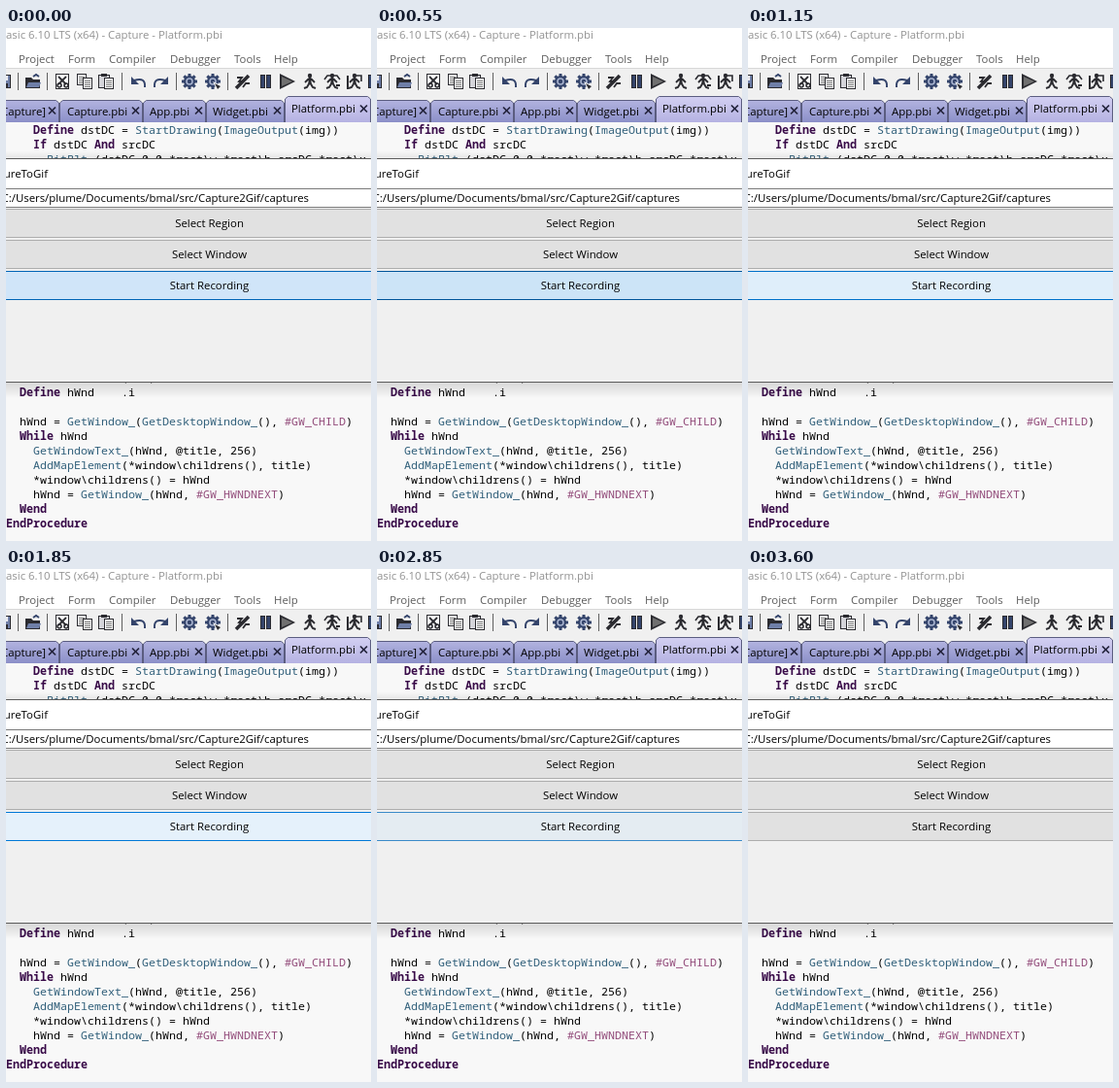
Recreate the animation shown at these times as an HTML page with a canvas. Size 376 px wide and 528 px high, loop 8000 ms.

```html
<!DOCTYPE html>
<html lang="en">
<head>
<meta charset="utf-8">
<title>Capture tool</title>
<style>
html, body { margin: 0; width: 100%; height: 100%; overflow: hidden; background: #fff; }
canvas { display: block; }
</style>
</head>
<body>
<canvas id="stage" width="376" height="528"></canvas>
<script>
const W = 376, H = 528, LOOP = 8000, STEP = 50, CELL = 7;
const ctx = document.getElementById('stage').getContext('2d', { alpha: false });
const UI = '11.4px "Open Sans", "Noto Sans", sans-serif';
const MONO = '11.67px "Noto Sans Mono", "DejaVu Sans Mono", monospace';
const INK = '#2b2b30', NAVY = '#34446b', STEEL = '#6f7fa8';

const CODE = [
  [28, 109, 'Define dstDC = StartDrawing(ImageOutput(img))'],
  [28, 124, 'If dstDC And srcDC'],
  [42, 139, 'BitBlt_(dstDC,0,0,*rect\\w,*rect\\h,srcDC,*rect\\x'],
  [119, 364, '(   )'],
  [14, 379, 'Define hWnd    .i'],
  [14, 409, 'hWnd = GetWindow_(GetDesktopWindow_(), #GW_CHILD)'],
  [14, 424, 'While hWnd'],
  [28, 439, 'GetWindowText_(hWnd, @title, 256)'],
  [28, 454, 'AddMapElement(*window\\childrens(), title)'],
  [28, 469, '*window\\childrens() = hWnd'],
  [28, 484, 'hWnd = GetWindow_(hWnd, #GW_HWNDNEXT)'],
  [14, 499, 'Wend'],
  [0, 514, 'EndProcedure']
];
const KEYWORD = /^(Define|If|And|While|Wend|EndProcedure)$/;

// Start button: time, fill, border
const KEYS = [
  [0, [208, 229, 249], [0, 100, 182]],
  [150, [204, 228, 247], [0, 84, 153]],
  [800, [204, 228, 247], [0, 84, 153]],
  [1250, [229, 241, 251], [0, 120, 215]],
  [2550, [229, 241, 251], [0, 120, 215]],
  [3450, [225, 225, 225], [173, 173, 173]],
  [LOOP, [225, 225, 225], [173, 173, 173]]
];

function rect(x, y, w, h, color) {
  ctx.fillStyle = color;
  ctx.fillRect(x, y, w, h);
}

function frame(x, y, w, h, fill, line) {
  rect(x, y, w, h, line);
  rect(x + 1, y + 1, w - 2, h - 2, fill);
}

function text(s, x, y, color = '#000', align = 'left', font = UI) {
  ctx.font = font;
  ctx.fillStyle = color;
  ctx.textAlign = align;
  ctx.fillText(s, x, y);
}

function path(points, color, width = 1.4, fill = false) {
  ctx.beginPath();
  points.forEach(([x, y], i) => i ? ctx.lineTo(x, y) : ctx.moveTo(x, y));
  if (fill) {
    ctx.fillStyle = color;
    ctx.fill();
  } else {
    ctx.strokeStyle = color;
    ctx.lineWidth = width;
    ctx.stroke();
  }
}

function at(x, y, draw) {
  ctx.save();
  ctx.translate(x, y);
  draw();
  ctx.restore();
}

function ring(x, y, r, color, from = 0, to = Math.PI * 2) {
  ctx.beginPath();
  ctx.arc(x, y, r, from, to);
  ctx.strokeStyle = color;
  ctx.lineWidth = 1.6;
  ctx.stroke();
}

function dot(x, y, r, color) {
  ctx.beginPath();
  ctx.arc(x, y, r, 0, Math.PI * 2);
  ctx.fillStyle = color;
  ctx.fill();
}

function codeLine(x, y, line) {
  for (const m of line.matchAll(/#\w+|\\?\w+|[^\s\w#\\]+/g)) {
    const s = m[0], next = line[m.index + s.length];
    const key = KEYWORD.test(s);
    let color = '#000';
    if (key) color = '#380a48';
    else if (s[0] === '#') color = '#924b7a';
    else if (/^[A-Z]/.test(s) && next === '(') color = '#305f7a';
    text(s, x + m.index * CELL, y, color, 'left', (key ? 'bold ' : '') + MONO);
  }
}

function page(x, y) {
  frame(x, y, 10, 12, '#fff', INK);
  for (let i = 3; i < 10; i += 2) rect(x + 2, y + i, 6, 1, '#777');
}

function undo() {
  ctx.beginPath();
  ctx.moveTo(-5, -1);
  ctx.quadraticCurveTo(7, -5, 6, 6);
  ctx.strokeStyle = NAVY;
  ctx.lineWidth = 2;
  ctx.stroke();
  path([[-8, -5], [-8, 3], [0, 3]], NAVY, 1, true);
}

function gear() {
  for (let i = 0; i < 8; i++) {
    const a = i * Math.PI / 4, x = Math.cos(a), y = Math.sin(a);
    path([[x * 4, y * 4], [x * 8, y * 8]], NAVY, 3);
  }
  dot(0, 0, 6, NAVY);
  ring(0, 0, 3, '#a9b4d0');
}

function figure() {
  dot(0, -6, 2.2, INK);
  path([[0, -4], [0, 2]], INK, 3);
  path([[-5, 1], [-2, -2], [2, -2], [5, 1]], INK, 1.8);
  path([[-6, 7], [-3, 6], [0, 1], [3, 6], [6, 7]], INK, 2);
}

const ICONS = [
  [-1, () => {
    frame(-7, -7, 13, 14, STEEL, INK);
    rect(-4, -6, 7, 5, '#e8e8ee');
    rect(-4, 2, 7, 4, INK);
  }],
  [28, () => {
    path([[-8, 7], [-8, -4], [-2, -4], [0, -2], [7, -2], [7, 7]], INK, 1, true);
    path([[-5, 1], [8, 1], [6, 6], [-7, 6]], STEEL, 1, true);
    path([[0, -5], [3, -7], [6, -5]], NAVY, 2);
  }],
  [58, () => {
    frame(-7, -8, 14, 16, '#fff', INK);
    path([[-4, -5], [4, 3]], INK, 1.8);
    path([[4, -5], [-4, 3]], INK, 1.8);
    ring(-3, 4, 2, INK);
    ring(4, 4, 2, INK);
  }],
  [81, () => { page(-8, -8); page(-2, -4); }],
  [103, () => {
    frame(-8, -7, 12, 14, '#d5d5da', INK);
    rect(-5, -8, 6, 3, INK);
    page(-2, -4);
  }],
  [137, undo],
  [159, () => { ctx.scale(-1, 1); undo(); }],
  [189, gear],
  [213, () => {
    gear();
    path([[0, 0], [8, 4], [4, 8]], '#fff', 1, true);
    path([[2, 2], [8, 5], [5, 8]], INK, 1, true);
  }],
  [244, () => {
    path([[-7, 7], [6, -6]], INK, 3.5);
    path([[-6, -4], [-1, -4], [-4, 0], [1, 0]], INK, 1.8);
    path([[0, 6], [3, 2], [7, 2]], INK, 1.8);
  }],
  [267, () => [-5, 1].forEach(x => frame(x, -7, 5, 14, NAVY, INK))],
  [290, () => {
    path([[-8, -8], [8, 0], [-8, 8]], INK, 1, true);
    path([[-6, -5], [5, 0], [-6, 5]], '#707070', 1, true);
  }],
  [313, figure],
  [336, () => {
    figure();
    path([[-8, -2], [-5, -6], [5, -6], [8, -2]], INK, 1.6);
    path([[4, 4], [8, 4]], INK, 2);
  }],
  [359, () => {
    figure();
    rect(-8, -6, 2, 14, INK);
    path([[2, -6], [7, -6], [7, 0]], INK, 1.6);
  }],
  [379, () => frame(-6, -7, 12, 14, NAVY, INK)]
];

function tab(x, w, label, textX, active) {
  const y = active ? 70 : 74;
  const g = ctx.createLinearGradient(0, y, 0, 97);
  g.addColorStop(0, active ? '#d3d0f2' : '#b3b4e0');
  g.addColorStop(1, active ? '#b5b2e2' : '#8b8fc8');
  ctx.beginPath();
  ctx.moveTo(x + .5, 97);
  ctx.lineTo(x + .5, y + 3);
  ctx.lineTo(x + 3.5, y + .5);
  ctx.lineTo(x + w - 3.5, y + .5);
  ctx.lineTo(x + w - .5, y + 3);
  ctx.lineTo(x + w - .5, 97);
  ctx.fillStyle = g;
  ctx.fill();
  ctx.strokeStyle = '#5b5d80';
  ctx.lineWidth = 1;
  ctx.stroke();
  text(label, textX, active ? 87 : 90);
  at(x + w - 7.5, active ? 83 : 85, () => {
    path([[-3.5, -3.5], [3.5, 3.5]], '#24243c', 1.7);
    path([[3.5, -3.5], [-3.5, 3.5]], '#24243c', 1.7);
  });
}

function editor() {
  rect(0, 0, W, H, '#fff');
  text('asic 6.10 LTS (x64) - Capture - Platform.pbi', 0, 11, '#929292');
  [['Project', 13], ['Form', 64], ['Compiler', 106], ['Debugger', 169], ['Tools', 235], ['Help', 276]]
    .forEach(([s, x]) => text(s, x, 36, '#5c5c5c'));
  rect(0, 42, W, 55, '#f0f0f0');
  rect(0, 41, W, 1, '#d7d7d7');
  [12, 42, 119, 175, 228].forEach(x => rect(x, 46, 1, 18, '#606060'));
  ICONS.forEach(([x, draw]) => at(x, 55, draw));
  tab(-40, 95, 'Capture]', -5);
  tab(55, 86, 'Capture.pbi', 63);
  tab(141, 65, 'App.pbi', 148);
  tab(206, 81, 'Widget.pbi', 213);
  tab(287, 89, 'Platform.pbi', 294, true);
  rect(0, 97, W, H - 97, '#f8f8f8');
  CODE.forEach(line => codeLine(...line));
}

function shadow(y0, y1, alpha) {
  const g = ctx.createLinearGradient(0, y0, 0, y1);
  g.addColorStop(0, `rgba(0,0,0,${alpha})`);
  g.addColorStop(1, 'rgba(0,0,0,0)');
  rect(0, Math.min(y0, y1), W, Math.abs(y1 - y0), g);
}

function button(y, label, fill, line) {
  frame(-4, y, W + 8, 30, fill, line);
  text(label, 209.5, y + 19, '#000', 'center');
}

function startColors(t) {
  const i = KEYS.findIndex(k => k[0] > t);
  const a = KEYS[i - 1], b = KEYS[i];
  const p = (t - a[0]) / (b[0] - a[0]);
  return [1, 2].map(n => `rgb(${a[n].map((v, c) => Math.round(v + (b[n][c] - v) * p))})`);
}

function dialog(t) {
  shadow(134, 126, .07);
  shadow(365, 381, .13);
  rect(0, 134, W, 231, '#5c5c5c');
  rect(0, 135, W, 30, '#fff');
  rect(0, 165, W, 199, '#f0f0f0');
  text('ureToGif', 43, 154, '#000', 'right');
  if (t >= 250 && t < 400) return;
  frame(-4, 165, W + 8, 20, '#fff', '#7a7a7a');
  text('C:/Users/plume/Documents/bmal/src/Capture2Gif/captures', 312, 179, '#000', 'right');
  button(186, 'Select Region', '#e1e1e1', '#adadad');
  button(218, 'Select Window', '#e1e1e1', '#adadad');
  button(250, 'Start Recording', ...startColors(t));
}

function draw(now) {
  const t = Math.floor(now % LOOP / STEP) * STEP;
  editor();
  dialog(t);
  requestAnimationFrame(draw);
}
requestAnimationFrame(draw);
</script>
</body>
</html>
```
